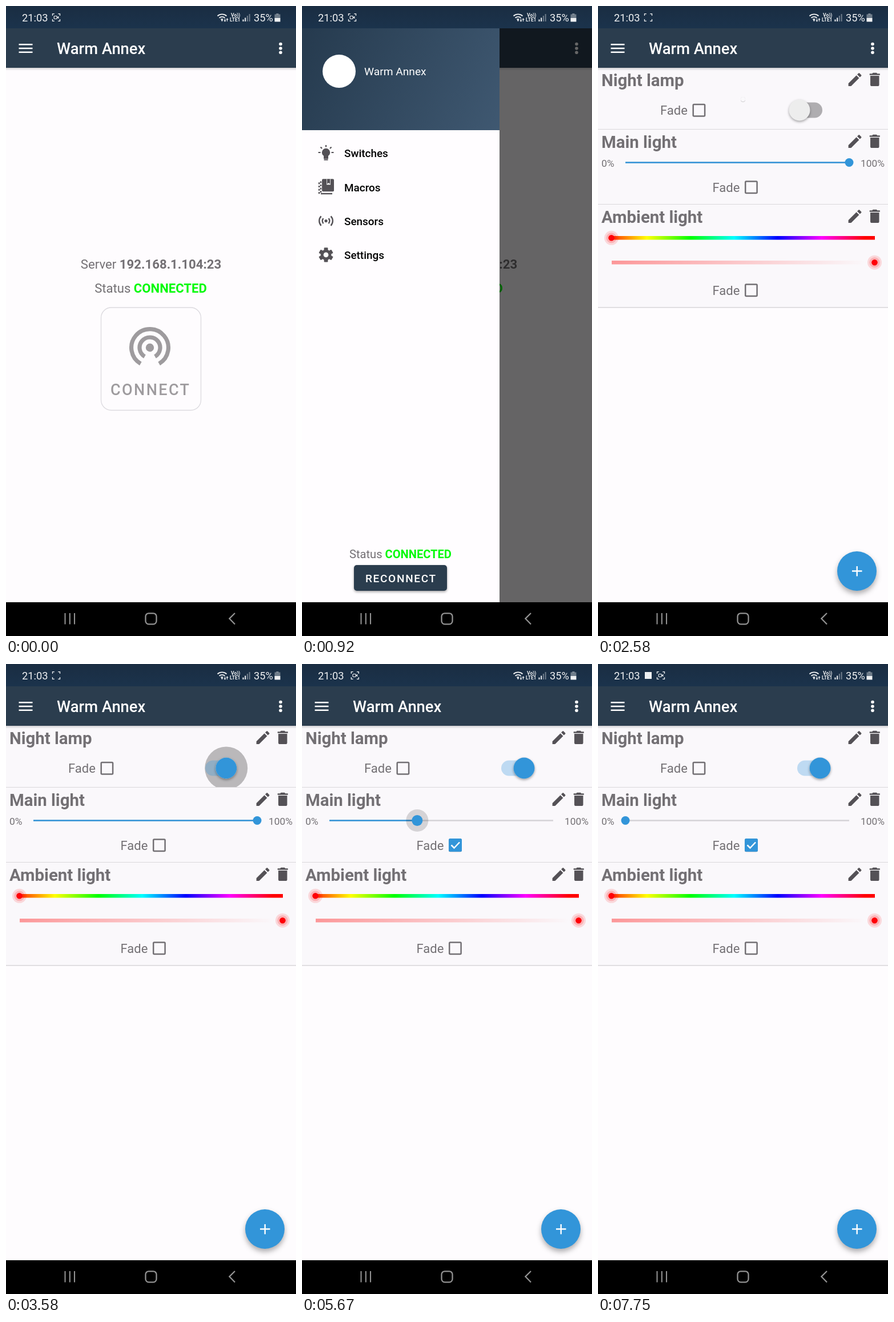
Animation, 508 px wide and 1101 px high, one loop 8 s. Source, as an HTML page:

```html
<!DOCTYPE html>
<html lang="en">
<head>
<meta charset="utf-8">
<title>Room control</title>
<style>
html, body { margin: 0; width: 100%; height: 100%; overflow: hidden; background: #000; }
svg { display: block; width: 508px; height: 1101px; font-family: Roboto, sans-serif; }
.mid { text-anchor: middle; }
.b { font-weight: 700; }
.m { font-weight: 500; }
.grey { fill: #737074; }
.green { fill: #00fa08; font-weight: 700; }
.line { fill: none; stroke: currentColor; }
.white { color: #fff; fill: #fff; }
.icon { color: #545156; fill: #545156; }
.fab { filter: drop-shadow(0 5px 5px rgba(0,0,0,.32)); }
.lift { filter: drop-shadow(0 2px 2px rgba(0,0,0,.35)); }
</style>
</head>
<body>
<svg id="stage" viewBox="0 0 508 1101"></svg>
<script>
const APP = 'Warm Annex', BLUE = '#3295d9';
const stage = document.getElementById('stage');

const circle = (x, y, r, fill, more = '') => `<circle cx="${x}" cy="${y}" r="${r}" fill="${fill}" ${more}/>`;
const rect = (x, y, w, h, fill, more = '') =>
  `<rect x="${x}" y="${y}" width="${w}" height="${h}" fill="${fill}" ${more}/>`;
const text = (x, y, size, s, cls = 'grey', more = '') =>
  `<text x="${x}" y="${y}" font-size="${size}" class="${cls}" ${more}>${s}</text>`;
const line = (d, w, more = '') => `<path class="line" d="${d}" stroke-width="${w}" ${more}/>`;
const at = (x, y, s, body, more = '') => `<g transform="translate(${x} ${y}) scale(${s})" ${more}>${body}</g>`;
const spin = (n, body) => Array.from({length: n}, (_, i) => `<g transform="rotate(${i * 360 / n})">${body}</g>`).join('');

const defs = `<defs>
  <linearGradient id="hue" gradientUnits="userSpaceOnUse" x1="9" x2="468" y1="0" y2="0">
    ${[0, 1, 2, 3, 4, 5, 6].map(i => `<stop offset="${i / 6}" stop-color="hsl(${i * 60},100%,50%)"/>`).join('')}
  </linearGradient>
  ${[['red', '#ff2020'], ['ash', '#858385']].map(([id, c]) => `<linearGradient id="${id}">
    <stop offset="0" stop-color="${c}" stop-opacity=".45"/><stop offset="1" stop-color="${c}" stop-opacity="0"/>
  </linearGradient>`).join('')}
  <linearGradient id="head" gradientUnits="userSpaceOnUse" x1="0" y1="60" x2="346" y2="217">
    <stop offset="0" stop-color="#263b4f"/><stop offset="1" stop-color="#3f5871"/>
  </linearGradient>
  <linearGradient id="top" x2="0" y2="1">
    <stop offset="0" stop-color="#1a2d42"/><stop offset="1" stop-color="#1b334c"/>
  </linearGradient>
  <linearGradient id="shade" x2="0" y2="1">
    <stop offset="0" stop-opacity=".16"/><stop offset="1" stop-opacity="0"/>
  </linearGradient>
  <clipPath id="card1"><path d="M0 108H508V215H0z"/></clipPath>
</defs>`;

const status = (x, y, size) =>
  text(x, y, size, 'Status <tspan class="green">CONNECTED</tspan>', 'grey mid');

const home = `<g id="home">
  ${text(254, 459, 22.2, 'Server <tspan class="b">192.168.1.104:23</tspan>', 'grey mid')}
  ${status(253.5, 501, 22.1)}
  ${rect(166.5, 527, 175, 179.5, 'none', 'rx="18" stroke="#dcdadf" stroke-width="1.3"')}
  ${at(252, 597, 3.6, circle(0, 0, 2, '#9e9b9e') +
    line('M-4.5 7.8A9 9 0 1 1 4.5 7.8M-2.5 4.33A5 5 0 1 1 2.5 4.33', 2), 'color="#9e9b9e"')}
  ${text(183, 680, 27, 'CONNECT', 'm', 'fill="#9e9b9e" letter-spacing="2.4"')}
</g>`;

const pencil = 'M3 17.25V21h3.75L17.81 9.94l-3.75-3.75zM20.71 7.04a1 1 0 0 0 0-1.41l-2.34-2.34a1 1 0 0 0-1.41 0l-1.83 1.83 3.75 3.75z';
const bin = 'M6 19a2 2 0 0 0 2 2h8a2 2 0 0 0 2-2V7H6zM19 4h-3.5l-1-1h-5l-1 1H5v2h14z';

const card = (top, bottom, title, fadeX, fadeY) => `
  ${rect(0, top, 508, bottom - top, '#faf8fb')}
  ${rect(0, bottom - 1, 508, 1.6, '#dad8db')}
  ${text(6, top + 31.5, 29.4, title, 'grey b')}
  ${at(434.8, top + 5.3, 1.27, `<path class="icon" d="${pencil}"/>`)}
  ${at(469.3, top + 5, 1.29, `<path class="icon" d="${bin}"/>`)}
  ${text(fadeX, fadeY + 8, 22, 'Fade')}
  ${rect(fadeX + 57.7, fadeY - 10, 20.4, 20.4, 'none', 'rx="1.5" stroke="#737074" stroke-width="2.5"')}`;

const ambient = (color, bar, fade) => `
  ${rect(24, 402, 461, 6.5, bar)}${rect(24, 445, 445, 6.5, `url(#${fade})`)}
  ${[[23.5, 405.3], [484.5, 448.2]].map(([x, y]) =>
    circle(x, y, 12.5, color, 'opacity=".13"') + circle(x, y, 9, color, 'opacity=".18"') + circle(x, y, 5.3, color)).join('')}`;

const lights = `<g id="lights">
  ${card(108, 216, 'Night lamp', 109, 182)}
  ${card(216, 347, 'Main light', 200.5, 316.5)}
  ${card(347, 527, 'Ambient light', 200.5, 496.5)}
  ${text(6, 281, 17.4, '0%')}${text(460, 281, 17.4, '100%')}
  <g id="disabled">
    ${rect(349, 168.5, 44, 27, '#dedcdf', 'rx="13.5"')}${circle(353, 182.5, 18.7, '#b5b3b6')}
    ${rect(56, 272.3, 384, 2.5, '#e5e3e6')}
    ${circle(48.5, 273.5, 3.8, 'none', 'stroke="#b9b7ba" stroke-width="2.4"')}
    ${ambient('#858385', '#858385', 'ash')}
  </g>
  <g id="enabled">
    <g clip-path="url(#card1)">${circle(385, 182, 0, '#000', 'id="tapSwitch"')}</g>
    ${rect(349, 168.5, 44, 27, '#000', 'id="track" rx="13.5" opacity=".3"')}
    <g id="knob" class="lift">${circle(0, 182, 18.5, '#ededed')}${circle(0, 182, 18.5, BLUE, 'id="knobOn"')}</g>
    ${rect(48, 272.3, 392, 2.5, '#d5d3d7')}${rect(48, 272.3, 0, 2.5, BLUE, 'id="level"')}
    ${circle(0, 273.5, 0, '#000', 'id="halo"')}${circle(0, 273.5, 7.5, BLUE, 'id="thumb"')}
    ${circle(268.5, 316.5, 0, '#000', 'id="tapFade"')}
    <g id="check" class="white">${rect(257, 305, 23, 23, BLUE, 'rx="2.5"')}${line('M261.5 316.5l5 5 9.5-10', 2.5)}</g>
    ${ambient('#ff0008', 'url(#hue)', 'red')}
  </g>
  <g id="refresh" class="lift">${circle(254, 163, 18, '#faf9fb')}</g>
  <g class="white">${circle(453.5, 987.5, 34.5, BLUE, 'class="fab"')}${line('M445 987.5h17.5M453.7 979v17.5', 2.4)}</g>
</g>`;

const appBar = `${rect(0, 108, 508, 5, 'url(#shade)')}${rect(0, 39, 508, 69, '#2b3d4e')}
  ${circle(34, 74, 0, '#fff', 'id="tapMenu" opacity=".2"')}
  <g class="white">${line('M22.5 67.3h24M22.5 74h24M22.5 80.7h24', 2.6)}
  ${[66.5, 74, 81.3].map(y => circle(481, y, 2.8, '#fff')).join('')}
  ${text(89, 84, 27.4, APP, 'white m')}</g>`;

const bulb = circle(0, -1, 7.2, '#545156') + rect(-4, 4, 8, 6, '#545156') + rect(-3.5, 10.5, 7, 2.2, '#545156') +
  line('M0-14v3.5M-13.5-1h4M9.5-1h4M-9.5-10.5l2.5 2.5M9.5-10.5L7-8', 2.2);
const book = rect(-7, -14, 21, 22, '#545156', 'rx="2"') + rect(1, -14, 7, 10, '#fff') +
  `<path d="M1.8-14h5.4v9l-2.7-2.4L1.8-5z"/>` +
  line('M-9-10v22M-12-8v20', 2.4, 'stroke-dasharray="3.2 2.4"') + line('M-9 11.7H11', 2.4);
const waves = circle(0, 0, 2.6, '#545156') +
  line('M-4.5-4.5a6.4 6.4 0 0 0 0 9M4.5-4.5a6.4 6.4 0 0 1 0 9M-8.5-8.2a11.8 11.8 0 0 0 0 16.4M8.5-8.2a11.8 11.8 0 0 1 0 16.4', 2.4);
const gear = circle(0, 0, 9.4, '#545156') + spin(6, rect(-3.4, -12.7, 6.8, 8, '#545156', 'rx="1"')) + circle(0, 0, 4.4, '#fff');

const items = [['Switches', bulb], ['Macros', book], ['Sensors', waves], ['Settings', gear]];
const drawer = `${rect(0, 39, 508, 1003, '#000', 'id="scrim"')}
<g id="drawer">
  ${rect(0, 39, 346, 1003, '#fffdff')}${rect(0, 39, 346, 178, 'url(#head)')}
  ${circle(65, 114, 29, '#fff')}${text(109, 121, 19.2, APP, 'white')}
  <g id="row">${rect(0, 228, 346, 59.5, '#000', 'opacity=".1"')}</g>
  ${items.map(([name, icon], i) => at(42, 257 + i * 59.3, 1, icon, 'class="icon"') +
    text(74, 264.3 + i * 59.3, 18.9, name, 'm')).join('')}
  ${status(172.5, 965, 20.1)}
  ${rect(91, 977, 163, 45, '#2b3d4e', 'rx="5" class="lift"')}
  ${text(111, 1007.3, 19, 'RECONNECT', 'white m', 'letter-spacing="1.7"')}
</g>`;

const system = `${rect(0, 0, 508, 39, 'url(#top)')}
<g class="white" opacity=".93">
  ${text(28, 27.3, 18.3, '21:03', 'white')}${text(434, 27.3, 18.2, '35%', 'white')}
  <g id="mail">${rect(-6, -6, 12, 12, '#fff')}</g>
  <g id="rec">${line('M-6.5-3v-3.3h3.3M3.2-6.3h3.3V-3M6.5 3v3.3H3.2M-3.2 6.3h-3.3V3', 1.3)}
    <g id="cam">${rect(-3.8, -2.5, 5, 5, 'none', 'rx="1" stroke="#fff" stroke-width="1.2"')}<path d="M1.2 0L4.4-2.4v4.8z"/></g></g>
  ${line('M370.5 17.5a12 12 0 0 1 16 0M373.5 20.8a7.8 7.8 0 0 1 10 0M376.3 23.6a3.5 3.5 0 0 1 4 0', 1.8)}
  ${circle(378.4, 25.3, 1.4, '#fff')}
  ${line('M383.5 27v-5M381.8 25l1.7 2 1.7-2M387.5 22v5M385.8 24l1.7-2 1.7 2', 1.1)}
  ${text(394, 18.6, 8.6, 'Vo))', 'white b')}${text(392, 27.2, 8.4, 'LTE1', 'white b')}
  ${[3.5, 6.5, 10, 13].map((h, i) => rect(414.5 + i * 3.7, 27 - h, 2, h, '#fff', `opacity="${i < 2 ? 1 : .4}"`)).join('')}
  ${rect(473.3, 13, 4.2, 2, '#fff', 'opacity=".4"')}${rect(470.5, 14.5, 10, 7, '#fff', 'opacity=".4"')}${rect(470.5, 21, 10, 6.5, '#fff')}
</g>
${rect(0, 1042, 508, 59, '#000')}
<g color="#929292">${line('M103.5 1061v19.5M111.8 1061v19.5M120 1061v19.5', 2.1)}
  ${rect(244.5, 1061.3, 19, 19, 'none', 'rx="5.5" class="line" stroke-width="2.3"')}
  ${line('M401 1061l-9.7 9.6 9.7 9.8', 2.2)}</g>`;

stage.innerHTML = defs + rect(0, 39, 508, 1003, '#fefcfe') + home + lights + appBar + drawer + system;

const el = {};
stage.querySelectorAll('[id]').forEach(e => el[e.id] = e);
const set = (id, props) => { for (const k in props) el[id].setAttribute(k, props[k]); };
const show = (id, yes) => set(id, {display: yes ? 'inline' : 'none'});
const ramp = (t, a, b) => Math.min(1, Math.max(0, (t - a) / (b - a)));
const ease = (t, a, b) => (1 - Math.cos(Math.PI * ramp(t, a, b))) / 2;
const tap = (id, t, start, full, release, end, r, alpha) => set(id, {
  r: t < start ? 0 : r * (.35 + .65 * ease(t, start, full)),
  opacity: alpha * (1 - ramp(t, release, end))
});

function draw(t) {
  const listed = t >= 1999, live = t >= 2330;
  show('home', !listed);
  show('lights', listed);
  show('disabled', !live);
  show('enabled', live);

  // Navigation drawer
  const open = 1 - (1 - ramp(t, 412, 924)) ** 5;
  show('drawer', open > 0 && !listed);
  set('drawer', {transform: `translate(${346 * (open - 1)} 0)`});
  set('scrim', {opacity: listed ? .018 * (1 - ramp(t, 2000, 2170)) : .6 * open});
  tap('tapMenu', t, 80, 250, 417, 580, 29, .2);
  const press = ramp(t, 1340, 1580);
  set('row', {transform: `translate(${120 * (1 - press)} 0) scale(${press} 1)`});

  // Refresh badge shrinks away
  const size = 1 - ease(t, 2400, 2667);
  show('refresh', size > 0);
  set('refresh', {transform: `translate(254 163) scale(${size}) translate(-254 -163)`});

  // Switch
  const on = ease(t, 3382, 3632), knobX = 353 + 36 * on;
  set('knob', {transform: `translate(${knobX} 0)`});
  set('knobOn', {opacity: Math.min(1, on * 2)});
  set('track', {fill: on > .3 ? BLUE : '#000'});
  set('tapSwitch', {cx: knobX});
  tap('tapSwitch', t, 3245, 3500, 3590, 3750, 37.5, .26);

  // Check box
  set('check', {opacity: ramp(t, 4400, 4560)});
  tap('tapFade', t, 4160, 4420, 4580, 4833, 36, .2);

  // Slider
  const x = 440 - 392 * ease(t, 5200, 6020);
  const held = ramp(t, 5040, 5200) * (1 - ramp(t, 6280, 6500));
  set('thumb', {cx: x, r: 7.5 + 2 * held});
  set('level', {width: x - 48});
  set('halo', {cx: x, r: 19.5 * held, opacity: .15});

  // Status icons
  const shift = ease(t, 5580, 5860);
  set('rec', {transform: `translate(${88 + 22 * shift} 20)`});
  const blink = t % 1007;
  show('cam', blink < 110 || blink >= 622);
  set('mail', {transform: `translate(88 20) scale(${ramp(t, 5690, 5860)})`});
}

const STEP = 1000 / 12, start = performance.now();
function tick() {
  const t = (performance.now() - start) % 8000;
  draw(Math.floor((t + 4) / STEP) * STEP % 8000);
  requestAnimationFrame(tick);
}
tick();
</script>
</body>
</html>
```
